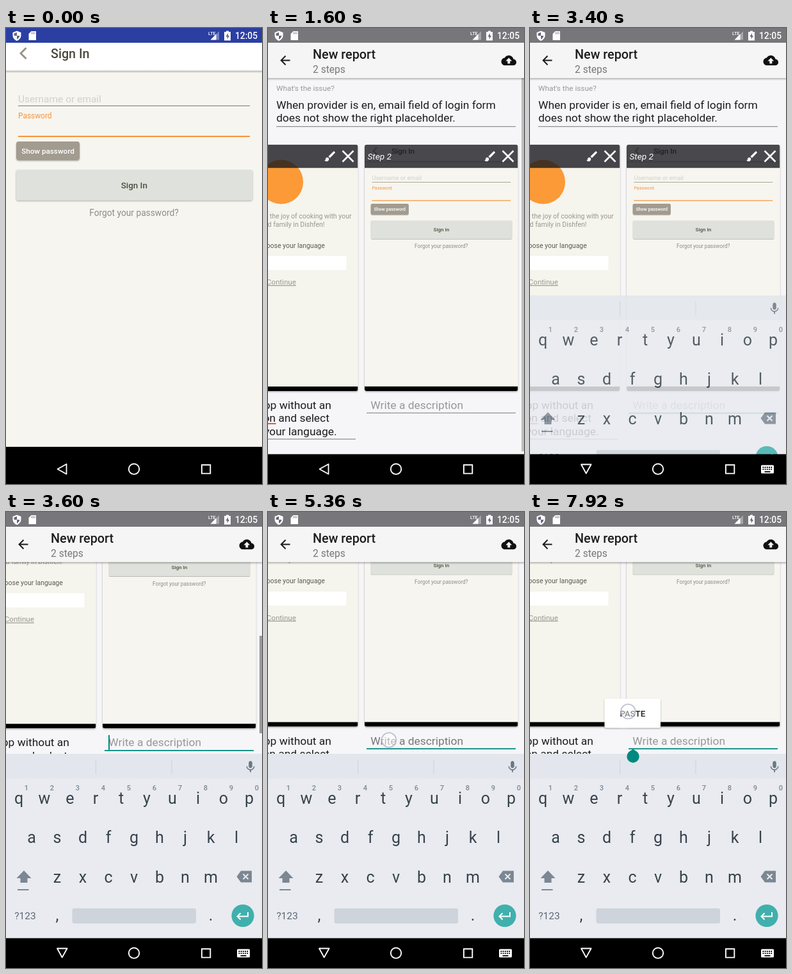
Recreate the animation shown at these times as an HTML page. Size 400 by 711 pixels, loop 8000 ms.

```html
<!DOCTYPE html>
<html lang="en">
<head>
<meta charset="utf-8">
<title>New report</title>
<style>
html, body { margin: 0; width: 100%; height: 100%; overflow: hidden; background: #000; }
svg { display: block; width: 100%; height: 100%; font-family: Roboto, "Liberation Sans", sans-serif; }
</style>
</head>
<body>
<svg id="stage" viewBox="0 0 400 711" preserveAspectRatio="none"></svg>
<script>
const LOOP = 8000;
const CARD_W = 239.5, CARD_TOP = 182, CARD_H = 384;

// markup helpers
const text = (x, y, size, fill, str, extra = '') =>
  `<text x="${x}" y="${y}" font-size="${size}" fill="${fill}" ${extra}>${str}</text>`;
const rect = (x, y, w, h, fill, extra = '') =>
  `<rect x="${x}" y="${y}" width="${w}" height="${h}" fill="${fill}" ${extra}/>`;
const group = (id, body, extra = '') => `<g id="${id}" ${extra}>${body}</g>`;
const stroke = (d, color, width, extra = '') =>
  `<path d="${d}" fill="none" stroke="${color}" stroke-width="${width}" ${extra}/>`;
const icon = (cx, cy, size, fill, d) =>
  `<path transform="translate(${cx - size / 2} ${cy - size / 2}) scale(${size / 24})" fill="${fill}" d="${d}"/>`;
const MID = 'text-anchor="middle"';
const BOLD = 'font-weight="500"';

const BRUSH = 'M7 14c-1.66 0-3 1.34-3 3 0 1.31-1.16 2-2 2 .92 1.22 2.49 2 4 2 2.21 0 4-1.79 4-4 0-1.66-1.34-3-3-3zm13.7-9.4l-1.3-1.3a1 1 0 0 0-1.4 0L9 12.25 11.75 15l8.95-9a1 1 0 0 0 0-1.4z';
const CLOUD = 'M19.35 10.04C18.67 6.59 15.64 4 12 4 9.11 4 6.6 5.64 5.35 8.04 2.34 8.36 0 10.91 0 14c0 3.31 2.69 6 6 6h13c2.76 0 5-2.24 5-5 0-2.64-2.05-4.78-4.65-4.96zM14 13v4h-4v-4H7l5-5 5 5z';
const MIC = 'M12 14c1.66 0 3-1.34 3-3V5c0-1.66-1.34-3-3-3S9 3.34 9 5v6c0 1.66 1.34 3 3 3zm5.3-3c0 3-2.54 5.1-5.3 5.1S6.7 14 6.7 11H5c0 3.41 2.72 6.23 6 6.72V21h2v-3.28c3.28-.48 6-3.3 6-6.72z';

const defs = `<defs>
  <filter id="soft" x="-20%" y="-20%" width="140%" height="150%">
    <feDropShadow dx="0" dy="1.2" stdDeviation="1.3" flood-opacity=".35"/>
  </filter>
  <linearGradient id="fade" x2="0" y2="1">
    <stop offset="0" stop-color="#000" stop-opacity=".26"/><stop offset="1" stop-color="#000" stop-opacity="0"/>
  </linearGradient>
  <clipPath id="cardClip"><rect x="0" y="${CARD_TOP}" width="${CARD_W}" height="${CARD_H}" rx="3"/></clipPath>
</defs>`;

const signIn =
  rect(0, 0, 400, 711, '#f7f5ef') +
  rect(0, 23, 400, 43.5, '#fff') + rect(0, 66.5, 400, 4, 'url(#fade)') +
  rect(0, 0, 400, 23, '#2b3fa3') +
  stroke('M31.5 31L23 39.5L31.5 48', '#979286', 2.8) +
  text(70, 47, 19.7, '#4a483b', 'Sign In', BOLD) +
  text(19, 116, 15.5, '#d2d0c9', 'Username or email') +
  rect(19, 120.8, 362, 1.2, '#8e8878') +
  text(19, 140.5, 11.9, '#f7943a', 'Password') +
  rect(19, 168, 362, 2, '#f7943a') +
  rect(16, 177, 99, 29, '#a29b8f', 'rx="4" filter="url(#soft)"') +
  text(65.5, 195.8, 11.7, '#fff', 'Show password', `${BOLD} ${MID}`) +
  rect(16, 221, 369, 47.5, '#dfe1dc', 'rx="3" filter="url(#soft)"') +
  text(200.3, 249.7, 13.4, '#4f4c3c', 'Sign In', `${BOLD} ${MID}`) +
  text(200, 292.8, 13.75, '#8f8c83', 'Forgot your password?', MID) +
  rect(0, 653, 400, 58, '#000');

const welcome =
  rect(0, CARD_TOP, CARD_W, CARD_H, '#f5f4ed') +
  `<circle cx="119.5" cy="240" r="34.5" fill="#fb9a37"/>` +
  text(119.8, 297, 10.5, '#99978f', 'Discover and share the joy of cooking with your', MID) +
  text(119.8, 309.5, 10.5, '#99978f', 'friends and family in Dishfen!', MID) +
  text(119.5, 342.5, 10.5, '#5d5a50', 'Please choose your language', MID) +
  rect(19, 355.4, 202.5, 22, '#fff') +
  text(27.5, 370.3, 10.5, '#5d5a50', 'English') +
  text(119.8, 400, 11.6, '#99978f', 'Continue', `${MID} text-decoration="underline"`) +
  rect(0, 559, CARD_W, 8, '#000');

const card = (x, label, shot, note) => `<g transform="translate(${x})">` +
  rect(0, CARD_TOP, CARD_W, CARD_H, '#f5f4ed', 'rx="3" filter="url(#soft)"') +
  `<g clip-path="url(#cardClip)">${shot}${rect(0, CARD_TOP, CARD_W, 36.2, '#15151b', 'opacity=".78"')}</g>` +
  text(4.5, 205, 13.6, '#fff', label, 'font-style="italic"') +
  icon(196, 200, 21, '#fff', BRUSH) +
  stroke('M215.5 191.5l17 17m0-17l-17 17', '#fff', 2.6) +
  note + '</g>';

const noteLines = ['Open the app without an', 'active sesion and select', 'English as your language.']
  .map((s, i) => text(9.7, 594 + i * 20.4, 17.4, '#1c1c1e', s)).join('') +
  rect(3, 640.5, 233, 1, '#777') + rect(60.5, 616, 51, 1.8, '#e0483e', 'id="typo"');

const noteEmpty =
  text(9.3, 594, 17.4, '#97979a', 'Write a description', 'id="hint"') +
  rect(3, 599.7, 233, 1, '#777', 'id="line"') +
  rect(9, 576.5, 2, 23, '#00897f', 'id="caret"');

const cards =
  card(10, 'Step 1', welcome, noteLines) +
  card(260, 'Step 2', `<g transform="translate(0 167.9) scale(${CARD_W / 400})">${signIn}</g>`, noteEmpty);

const page = rect(0, 0, 400, 711, '#f6f6f8') +
  group('content',
    text(13, 98, 11.8, '#98989b', 'What\'s the issue?') +
    text(13, 126, 17.4, '#1c1c1e', 'When provider is en, email field of login form') +
    text(13, 146.4, 17.4, '#1c1c1e', 'does not show the right placeholder.') +
    rect(13, 153.2, 374, 1, '#777') +
    group('cards', cards)) +
  rect(396, 77, 4, 583, '#929294', 'id="bar"');

const appBar =
  rect(0, 23, 400, 55, '#f5f5f5') + rect(0, 78, 400, 4, 'url(#fade)') +
  rect(0, 0, 400, 23, '#77777b') +
  stroke('M34.5 50.5H21M27.5 43.5L20.5 50.5L27.5 57.5', '#1a1a1a', 1.9) +
  text(70, 48, 19.8, '#1d1d1f', 'New report', BOLD) +
  text(70, 69.8, 15.6, '#77777a', '2 steps') +
  icon(376.3, 50.5, 23.5, '#111', CLOUD);

function keyboardMarkup() {
  const INK = '#37434d', SOFT = '#7b8793';
  const row = (keys, x0, y) => [...keys].map((k, i) => text(x0 + 40 * i, y, 25, INK, k, MID)).join('');
  const digits = [...'1234567890'].map((d, i) => text(32 + 40 * i, 434, 11, SOFT, d, `${MID} ${BOLD}`)).join('');
  return rect(0, 377, 400, 300, '#e9ebf0') + rect(0, 377, 400, 38.5, '#e3e6ec') +
    rect(140, 386, 1, 23, '#cfd4da') + rect(258.5, 386, 1, 23, '#cfd4da') +
    icon(382, 397.5, 22, '#6b7885', MIC) +
    row('qwertyuiop', 20, 455) + digits + row('asdfghjkl', 40, 516) + row('zxcvbnm', 80, 577.5) +
    `<path d="M28 559L39.5 571H33.5V578H22.5V571H16.5Z" fill="${SOFT}"/>` + rect(18, 588, 17.5, 2, SOFT) +
    `<path d="M360.5 568.5L367 559.5H384V577.5H367Z" fill="${SOFT}"/>` +
    stroke('M370.5 564.5l8 8m0-8l-8 8', '#e9ebf0', 2) +
    text(30, 635, 15.5, '#5d6975', '?123', MID) + text(80, 637, 25, INK, ',', MID) +
    rect(103.5, 618, 193.5, 23.5, '#cdd4dc', 'rx="3"') + text(320, 637, 25, INK, '.', MID) +
    `<circle cx="370" cy="629.5" r="17.6" fill="#40b0ac"/>` +
    stroke('M378 624V630.5H362M366.5 625.5L361.5 630.5L366.5 635.5', '#fff', 2);
}

const statusIcons =
  `<path d="M17 4.5L23.5 7V11.5C23.5 15.5 20.5 18.8 17 20C13.5 18.8 10.5 15.5 10.5 11.5V7Z" fill="#fff"/>` +
  `<path d="M17 6.8V12H12.6V8.5ZM17 12H21.3C20.8 14.8 19.2 16.8 17 17.8Z" fill="#62667f"/>` +
  `<path d="M39.5 5H47V19H35.5V9Z" fill="#fff"/>` +
  stroke('M40.3 6.5v3m2.3-3v3m2.3-3v3', '#777b90', 1) +
  text(316, 10.5, 7.2, '#fff', 'LTE', BOLD) +
  `<path d="M333 5V18.5H319.5Z" fill="#fff" opacity=".35"/><path d="M328.5 9.5V18.5H319.5Z" fill="#fff"/>` +
  `<path d="M344 4.5H348V6H351V19.5H341V6H344Z" fill="#fff"/>` +
  `<path d="M347 8L343.3 13.6H345.6V17.5L349 12H347Z" fill="#666a82"/>` +
  text(358, 17, 13.8, '#fff', '12:05', BOLD);

const navIcons =
  stroke('M94.5 680V695.5L80.5 687.7Z', '#fff', 1.8, 'id="back" stroke-linejoin="round"') +
  `<circle cx="200" cy="687.7" r="8.2" fill="none" stroke="#fff" stroke-width="1.9"/>` +
  stroke('M305.9 681.2H319.3V694.6H305.9Z', '#fff', 1.9) +
  group('keyIcon', rect(361, 681.5, 20, 13, '#fff', 'rx="1.5"') +
    stroke('M363.5 685H379M363.5 688.2H379', '#000', 1.8, 'stroke-dasharray="1.8 1.4"') +
    rect(366.5, 691, 9, 1.7, '#000'));

const popup =
  rect(116.5, 291, 87.5, 45.5, '#fff', 'rx="2" filter="url(#soft)"') +
  text(160.3, 318.6, 13.3, '#1d1d1f', 'PASTE', `${BOLD} ${MID}`) +
  `<path d="M161 369.5L167.8 374.3A9.7 9.7 0 1 1 154.2 374.3Z" fill="#00897f"/>`;

document.getElementById('stage').innerHTML = defs +
  group('signIn', signIn) +
  group('report', rect(0, -8, 400, 9, '#2b3d93') +
    group('page', page) + group('keys', keyboardMarkup()) + appBar + rect(0, 664.5, 400, 50, '#000')) +
  statusIcons + navIcons + group('popup', popup) +
  group('touch', `<circle r="11.3" fill="#fff" fill-opacity=".5" stroke="#aeb0c6" stroke-opacity=".75" stroke-width="1.8"/>`);

const el = {};
document.querySelectorAll('[id]').forEach(n => el[n.id] = n);
const set = (id, attrs) => { for (const k in attrs) el[id].setAttribute(k, attrs[k]); };
const show = (id, on) => set(id, { visibility: on ? 'visible' : 'hidden' });
const within = (t, spans) => spans.find(([a, b]) => t >= a && t < b);
// last value whose time has passed
const step = (t, keys) => keys.reduce((v, [at, val]) => t >= at ? val : v, 0);

const TOUCHES = [[2740, 3000, 204, 583], [5360, 5760, 189, 355.5], [7740, 8000, 153.3, 311]];
const CARET = [[3600, 4080], [4580, 4960], [5560, 5980], [6500, 7000], [7500, 7920]];

function draw(t) {
  const typing = t >= 3400;
  show('signIn', t < 920);
  set('report', {
    display: t < 920 ? 'none' : 'inline',
    transform: `translate(0 ${step(t, [[920, 7.4], [1080, 2], [1200, 0]])})`
  });
  const scrollY = step(t, [[3600, -228.7], [3760, -231.4]]);
  set('content', { transform: `translate(0 ${scrollY})` });
  set('cards', { transform: `translate(${step(t, [[1600, -109]])} 0)` });

  const scrolled = t >= 3600;
  set('bar', {
    y: scrolled ? 193 : 77, height: scrolled ? 152 : 583,
    opacity: step(t, [[920, 0.75], [1600, 0.55], [1880, 0.2], [1980, 0], [3600, 0.9], [3760, 0.4], [4080, 0]])
  });
  show('typo', t >= 1600);

  const focused = t >= 3240;
  set('line', { fill: focused ? '#00897f' : '#777', height: focused ? 1.8 : 1 });
  set('hint', { fill: t >= 5360 && t < 5560 ? '#77777a' : '#97979a' });
  show('caret', within(t, CARET));

  set('keys', {
    display: typing ? 'inline' : 'none',
    transform: `translate(0 ${t < 3600 ? 40 : 0})`,
    opacity: t < 3600 ? 0.85 : 1
  });
  show('keyIcon', typing);
  set('back', { transform: typing ? 'rotate(-90 87.5 687.5)' : '' });

  const pop = Math.min(1, Math.max(0, (t - 5760) / 220));
  set('popup', { opacity: pop });

  const touch = within(t, TOUCHES);
  show('touch', touch);
  if (touch) set('touch', { transform: `translate(${touch[2]} ${touch[3]})` });
}

const start = performance.now();
function tick() {
  draw((performance.now() - start) % LOOP);
  requestAnimationFrame(tick);
}
tick();
</script>
</body>
</html>
```
